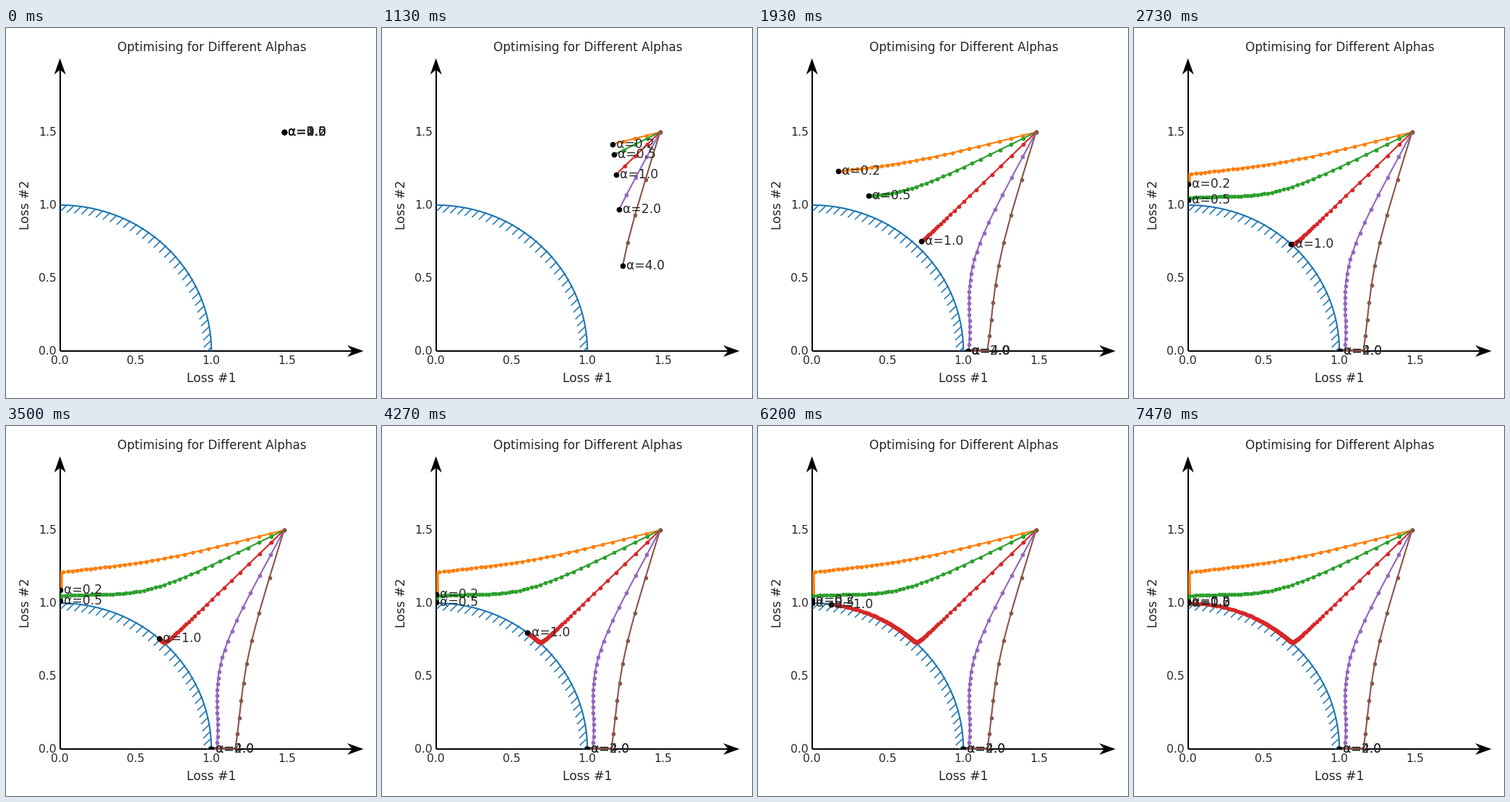
Recreate the animation shown at these times as a matplotlib script. Size 512 by 512 pixels, loop 7660 ms.

```python
import numpy as np
import matplotlib.pyplot as plt
from matplotlib.animation import FuncAnimation
from matplotlib.patches import Polygon

SIZE, DPI = 512, 102.4
INTERVAL, LOOP = 20, 7660
FRAMES = LOOP // INTERVAL
STEP_MS = 1000 / 30             # one descent step
LEAD, STEPS = 30, 200           # steps held before the descent, steps after
RATE = 0.02
START = (1.48, 1.5)
ALPHAS = [0.25, 0.5, 1.0, 2.0, 4.0]
INK = "0.15"
LEFT, RIGHT, TOP, BOTTOM = 74.7, 493.6, 43.1, 447.0

plt.rcParams["font.family"] = "DejaVu Sans"


def descend(alpha):
    """Gradient descent on L1 + alpha * L2, with radius 1 + eps**2 and angle th."""
    eps = np.sqrt(np.hypot(*START) - 1)
    th = np.arctan2(START[1], START[0])
    path = []
    for _ in range(STEPS):
        r, c, s = 1 + eps**2, np.cos(th), np.sin(th)
        path.append((r * c, r * s))
        eps -= RATE * 2 * eps * (c + alpha * s)
        th -= RATE * r * (alpha * c - s)
        th = np.clip(th, 0, np.pi / 2)
    return np.array(path)


fig = plt.figure(figsize=(SIZE / DPI, SIZE / DPI), dpi=DPI, facecolor="white")
ax = fig.add_axes([LEFT / SIZE, 1 - BOTTOM / SIZE,
                   (RIGHT - LEFT) / SIZE, (BOTTOM - TOP) / SIZE])
ax.set(xlim=(0, 2), ylim=(0, 2))
ax.axis("off")


def put(x, y, text, size=12, ha="center", **kw):
    """Text with its baseline at a pixel position counted from the top left."""
    fig.text(x / SIZE, 1 - y / SIZE, text, fontsize=size, color=INK,
             ha=ha, va="baseline", **kw)


def arrow_axis(tip, direction):
    """Axis line from the corner to tip with a swept-back arrowhead, in pixels."""
    tip, d = np.array(tip), np.array(direction)
    n = d[::-1]
    corner = np.array([LEFT, SIZE - BOTTOM])
    notch, back = tip - 16 * d, tip - 22.5 * d
    head = [tip, back + 8 * n, notch, back - 8 * n]
    shaft = [corner - n, corner + n, notch + n, notch - n]
    for shape in (head, shaft):
        ax.add_patch(Polygon(shape, transform=None, fc="k", lw=0,
                             clip_on=False, zorder=1))


arrow_axis((RIGHT + 1.2, SIZE - BOTTOM), (1, 0))
arrow_axis((LEFT, SIZE - TOP + 1.2), (0, 1))

mid_x, mid_y = (LEFT + RIGHT) / 2, (TOP + BOTTOM) / 2
put(mid_x + 0.7, 32, "Optimising for Different Alphas", 11.92)
put(mid_x, 490.5, "Loss #1")
put(31.5, mid_y, "Loss #2", rotation=90, rotation_mode="anchor")
for v in (0, 0.5, 1, 1.5):
    put(LEFT + v * (RIGHT - LEFT) / 2, 465, f"{v:.1f}", 11)
    put(69.8, BOTTOM - v * (BOTTOM - TOP) / 2 + 5.2, f"{v:.1f}", 11, "right")

# Pareto front with slanted ticks centred just inside it
arc = np.linspace(0, np.pi / 2, 200)
ax.plot(np.cos(arc), np.sin(arc), color="C0", lw=1.5)
spots = np.arange(0, np.pi / 2, 0.05)
slant = np.array([-0.021, 0.021, np.nan])
tick_x = np.add.outer(0.975 * np.cos(spots), slant).ravel()
tick_y = np.add.outer(0.975 * np.sin(spots), slant).ravel()
ax.plot(tick_x, tick_y, color="C0", lw=1.1)

runs = []
for i, alpha in enumerate(ALPHAS):
    trail, = ax.plot([], [], ".-", color=f"C{i + 1}", lw=1.5, ms=6)
    dot, = ax.plot([], [], "o", color="k", ms=4.4, mew=1, zorder=3)
    label = ax.text(0, 0, f"α={alpha:.1f}", fontsize=12, color=INK,
                    va="center", zorder=4)
    runs.append((descend(alpha), trail, dot, label))


def update(frame):
    # Sample late in each frame so steps fall on the nearest frame boundary
    step = max(0, int((frame + 0.7) * INTERVAL / STEP_MS) - LEAD)
    for path, trail, dot, label in runs:
        x, y = path[step]
        trail.set_data(path[:step + 1, 0], path[:step + 1, 1])
        dot.set_data([x], [y])
        label.set_position((x + 0.025, y))


anim = FuncAnimation(fig, update, frames=FRAMES, interval=INTERVAL,
                     repeat=True, repeat_delay=0)
plt.show()
```
